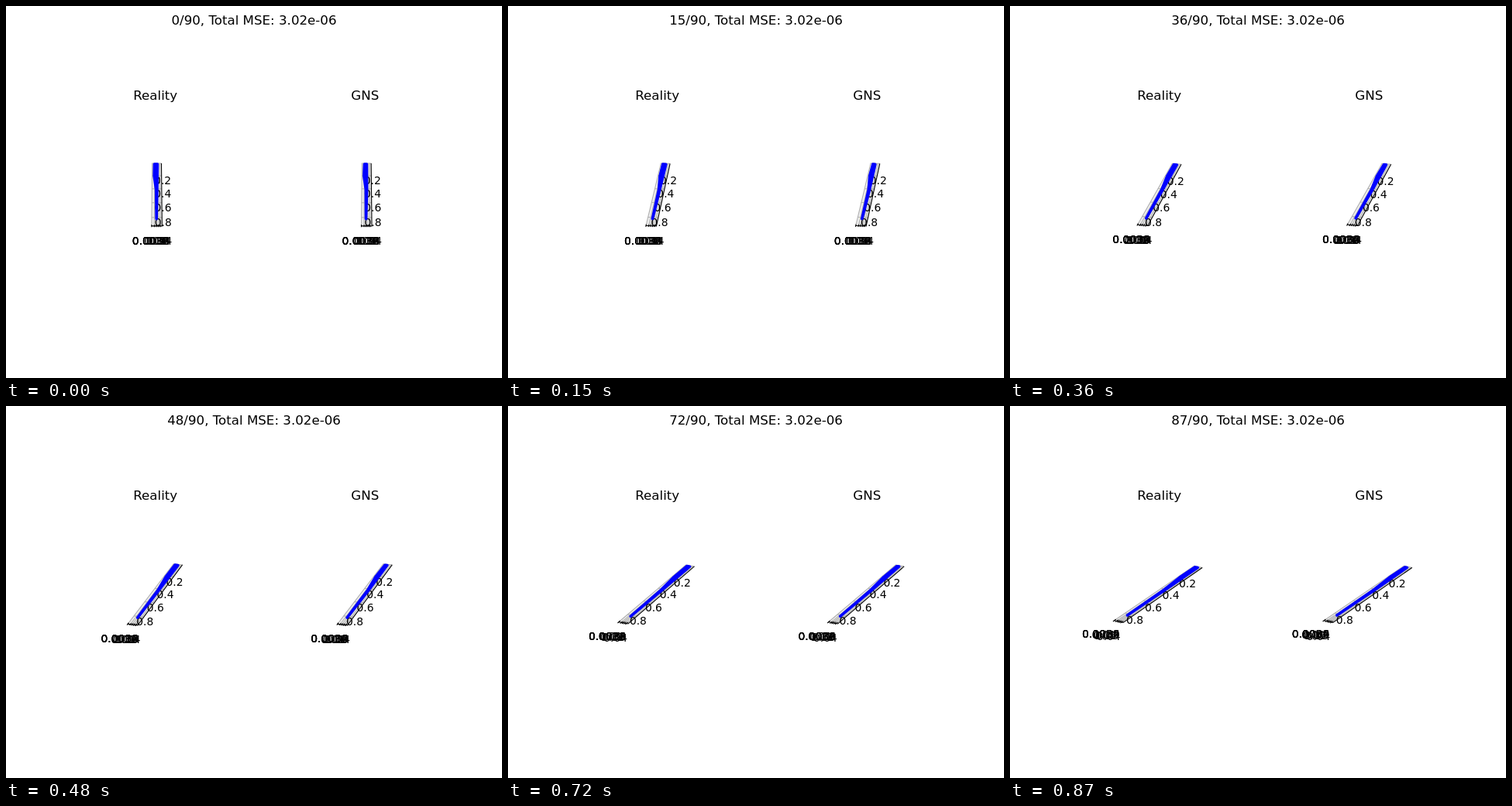
Recreate the animation shown at these times as an HTML page. Size 640 by 480 pixels, loop 0.9 s.

```html
<!DOCTYPE html>
<html lang="en">
<head>
<meta charset="utf-8">
<title>Reality and GNS</title>
<style>
  html, body { margin: 0; width: 100%; height: 100%; overflow: hidden; background: #fff; }
  svg { display: block; width: 640px; height: 480px; }
  text { font: 13.89px "DejaVu Sans", sans-serif; text-anchor: middle; }
  .title { font-size: 16.67px; }
  .pane { fill: #ededed; stroke: none; }
  .grid, .axis { fill: none; stroke-width: 1.1; }
  .grid { stroke: #b0b0b0; }
  .axis { stroke: #000; }
  .data { fill: #00f; stroke: #00f; stroke-width: 3.6; stroke-linejoin: round; }
</style>
</head>
<body>
<svg viewBox="0 0 640 480">
  <text class="title" id="count" x="320" y="24"></text>
  <text class="title" x="192.7" y="121">Reality</text>
  <text class="title" x="463.3" y="121">GNS</text>
  <g id="left"></g>
  <g id="right" transform="translate(270.66 0)"></g>
</svg>
<script>
const PERIOD = 900, STEP = 30;
const W = 6.3, L = 105.4;            // half width and half length of the floor
const CX = 194.6, CY = 240.7;        // screen centre of the left plot
const TILT = 0.382, PERSP = 0.000641;
const LABEL_DROP = 11;               // from anchor to text baseline

const xTicks = [1, 2, 3, 4].map(i => ({ at: -5.26 + 2.316 * i, text: "0.0" + i }));
const yTicks = [2, 4, 6, 8].map(i => ({ at: -L + 2 * L * i / 9.1, text: "0." + i }));
const zLabels = ["0.0030", "0.0032", "0.0034", "0.0036"];

// Outline of the moving body on the floor
const body = (x0, x1, tail) =>
  [[x0, -102], [x1, -102], [0.4, -10], [tail, 84], [-0.9, -10], [-3.6, -58]];
const plots = [
  { el: document.getElementById("left"), shape: body(-3.4, 0.9, -0.4) },
  { el: document.getElementById("right"), shape: body(-3, 0.2, -0.7) }
];
const count = document.getElementById("count");

function camera(angle) {
  const c = Math.cos(angle), s = Math.sin(angle);
  return ([x, y]) => {
    const depth = x * s + y * c, k = 1 / (1 - depth * PERSP);
    return [CX + (x * c - y * s) * k, CY + depth * TILT * k];
  };
}

function scene(project, shape) {
  const points = list => list.map(p => project(p).map(v => v.toFixed(2)).join()).join(" ");
  const line = (cls, ...list) => `<polyline class="${cls}" points="${points(list)}"/>`;
  const area = (cls, list) => `<polygon class="${cls}" points="${points(list)}"/>`;
  const label = (p, text) => {
    const [x, y] = project(p);
    return `<text x="${x.toFixed(2)}" y="${(y + LABEL_DROP).toFixed(2)}">${text}</text>`;
  };
  return [
    area("pane", [[-W, -L], [W, -L], [W, L], [-W, L]]),
    ...xTicks.map(t => line("grid", [t.at, -L], [t.at, L])),
    ...yTicks.map(t => line("grid", [-W, t.at], [W, t.at])),
    line("grid", [-W, L], [-W, -L], [W, -L]),
    line("axis", [-W, L], [W, L], [W, -L]),
    ...xTicks.map(t => line("axis", [t.at, L - 4], [t.at, L + 3])),
    line("axis", [-W, L - 4], [-W, L + 3]),
    ...xTicks.map(t => label([t.at, L + 30], t.text)),
    ...yTicks.map(t => label([W + 1.5, t.at], t.text)),
    ...zLabels.map(text => label([-W - 0.5, L + 30], text)),
    area("data", shape)
  ].join("");
}

let shown = -1;
function draw(time) {
  const step = Math.floor(time % PERIOD / STEP);
  if (step === shown) return;
  shown = step;
  count.textContent = `${step * 3}/90, Total MSE: 3.02e-06`;
  const project = camera(step * Math.PI / 180);   // one degree per step
  for (const { el, shape } of plots) el.innerHTML = scene(project, shape);
}

function tick() {
  draw(performance.now());
  requestAnimationFrame(tick);
}
tick();
</script>
</body>
</html>
```
